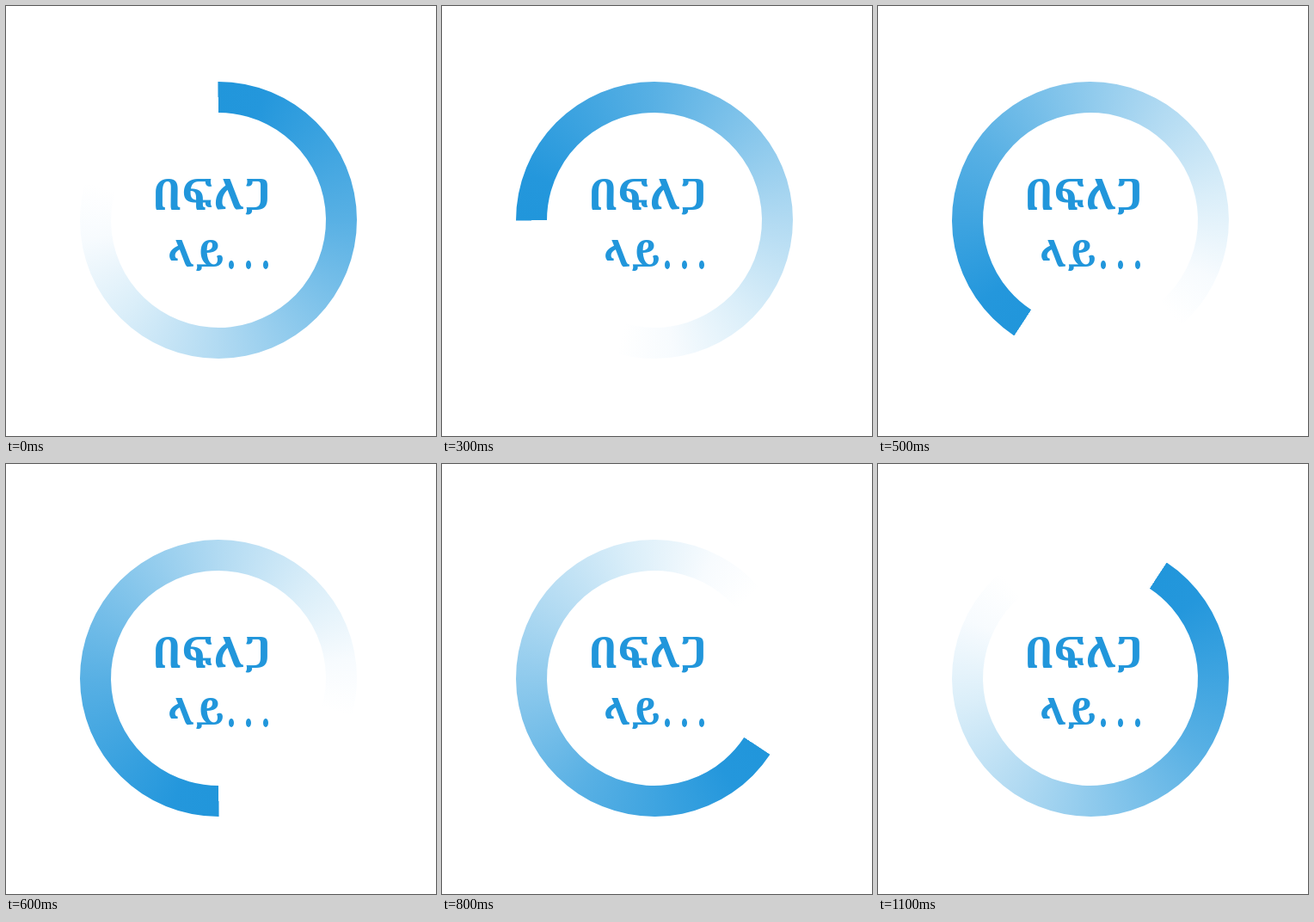
An HTML page with a canvas for the animation above (1200 ms loop, 500x500 px).

```html
<!DOCTYPE html>
<html lang="am">
<head>
<meta charset="utf-8">
<title>በፍለጋ ላይ...</title>
<style>
  html, body { margin: 0; width: 100%; height: 100%; overflow: hidden; background: #fff; }
  canvas { display: block; width: 500px; height: 500px; }
</style>
</head>
<body>
<canvas id="stage" width="500" height="500" role="img" aria-label="በፍለጋ ላይ..."></canvas>
<script>
const ctx = document.getElementById('stage').getContext('2d');
const BLUE = '#2196db';
const CX = 247, CY = 249, OUTER = 161, INNER = 125;
const STEP = 100, COUNT = 12;
const FONTS = '"Noto Serif Ethiopic", "Noto Serif", "Noto Sans Ethiopic", serif';
const rad = deg => deg * Math.PI / 180;

// Degrees past the head, colour
const FADE = [
  [0, BLUE], [20, '#2497dc'], [45, '#36a0df'], [90, '#58b0e4'], [135, '#84c5eb'],
  [180, '#b1daf2'], [225, '#daeef9'], [262, '#f7fbfe'], [286, '#ffffff'], [360, '#ffffff']
];

const setFont = size => { ctx.font = `bold ${size}px ${FONTS}`; };

// Finds the font size at which the text's ink has the given width
function makeLine(text, left, baseline, width) {
  setFont(100);
  const m = ctx.measureText(text);
  const size = 100 * width / (m.actualBoundingBoxLeft + m.actualBoundingBoxRight);
  return { text, size, baseline, x: left + m.actualBoundingBoxLeft * size / 100 };
}

const LINES = [
  makeLine('በፍለጋ', 174, 237, 130),
  makeLine('ላይ', 190, 303, 62)
];

function drawLabel() {
  ctx.fillStyle = BLUE;
  for (const line of LINES) {
    setFont(line.size);
    ctx.fillText(line.text, line.x, line.baseline);
  }
  for (let i = 0; i < 3; i++) {
    ctx.beginPath();
    ctx.ellipse(262 + i * 20, 301, 3, 5, 0, 0, Math.PI * 2);
    ctx.fill();
  }
}

// Every third step is a quarter turn
function headAngle(step) {
  return Math.floor(step / 3) * 90 + [0, 30, 56.4][step % 3];
}

function drawRing(step) {
  const start = rad(-90.2 - headAngle(step));
  const end = start + rad(286);
  const fill = ctx.createConicGradient(start, CX, CY);
  for (const [deg, color] of FADE) fill.addColorStop(deg / 360, color);
  ctx.fillStyle = fill;
  ctx.beginPath();
  ctx.arc(CX, CY, OUTER, start, end);
  ctx.arc(CX, CY, INNER, end, start, true);
  ctx.fill();
}

function draw() {
  const step = Math.floor(performance.now() / STEP) % COUNT;
  ctx.fillStyle = '#fff';
  ctx.fillRect(0, 0, 500, 500);
  drawRing(step);
  drawLabel();
  requestAnimationFrame(draw);
}
draw();
</script>
</body>
</html>
```
